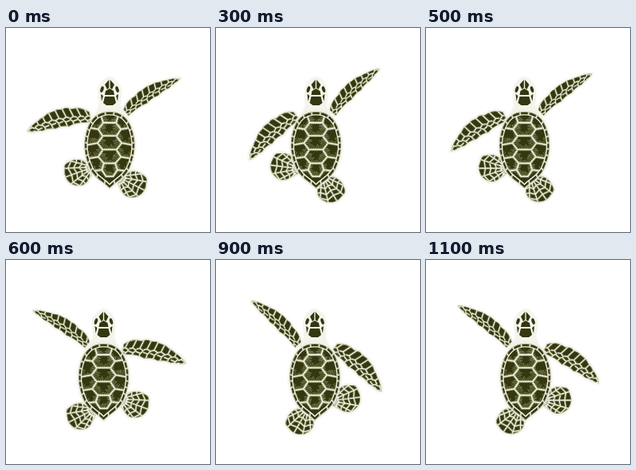
An HTML page with a canvas that plays this animation: 256 by 256 pixels, repeating every 1.2 s.

```html
<!DOCTYPE html>
<html lang="en">
<head>
<meta charset="utf-8">
<title>Swimming turtle</title>
<style>
html, body { margin: 0; width: 100%; height: 100%; overflow: hidden; background: #fff; }
canvas { display: block; width: 256px; height: 256px; }
</style>
</head>
<body>
<canvas width="256" height="256"></canvas>
<script>
const ctx = document.querySelector('canvas').getContext('2d');
const DARK = '#34370f', PALE = '#f1f2e4', HALO = '#f4f4ea', OLIVE = '#a3a778';
const STEP = 100, HALF = 6;

// Each stroke: raised flipper, trailing flipper, trailing-side foot, other foot (degrees), other hip x
const strokes = [
  [-32, 13, 20, 27, 15],
  [-37, 27, 4, 48, 12],
  [-41, 37, -8, 62, 10],
  [-43, 43, -7, 60, 10],
  [-41, 39, -4, 58, 10],
  [-37, 33, 0, 55, 9]
];
const bodyX = [130, 130, 130, 125.5, 124.5, 123.5, 122.5, 122.5, 123, 124, 124.5, 125];

const flipper = new Path2D('M-3-5C4-12 9-14 16-14C19-13 21-17 26-17C30-15 33-18 38-17C42-15 46-17 51-14C55-11 58-12 62-9C68-7 75-3 78 1C72 5 66 2 60 5C54 3 48 4 43 6C37 4 31 5 26 7C18 4 9 6-2 8Z');
const foot = new Path2D('M-4-5C4-11 8-17 18-17C22-16 27-17 29-13L32-4C33 2 31 8 27 12C20 18 14 18 9 15C4 12 0 8-4 6Z');
const shell = new Path2D('M0-43C16-43 25-33 29-18C34-2 31 15 24 30C18 41 8 45 0 53C-8 45-18 41-24 30C-31 15-34-2-29-18C-25-33-16-43 0-43Z');
const neck = new Path2D('M0-85C5-83 10-78 12-73C13-65 12-57 11-52C12-47 14-44 17-38L-17-38C-14-44-12-47-11-52C-12-57-13-65-12-73C-10-78-5-83 0-85Z');
const headPlates = new Path2D('M-.7-83L-6-77L-3-71L-.7-73ZM.7-83L6-77L3-71L.7-73ZM0-72L5-69L6-64L-6-64L-5-69ZM-6-62L6-62L8-54L4-51L-4-51L-8-54ZM-8-63L-11-65L-10-56ZM8-63L11-65L10-56Z');

const line = (path, ...p) => {
  path.moveTo(p[0], p[1]);
  for (let i = 2; i < p.length; i += 2) path.lineTo(p[i], p[i + 1]);
};

const flipperSeams = new Path2D();
for (let x = 0; x < 76; x += 9) {
  const y = -1 - 5 * Math.sin(x / 78 * Math.PI);
  line(flipperSeams, x - 4, y + 2, x, y, x + 5, y + 2);
  line(flipperSeams, x + 4, y - 16, x, y);
  line(flipperSeams, x + 5, y + 2, x + 2, y + 6, x - 4, y + 5);
  line(flipperSeams, x + 2, y + 6, x, 12);
}

const footSeams = new Path2D();
for (let i = -3; i <= 3; i++) {
  const c = Math.cos(i * 0.3), s = Math.sin(i * 0.3);
  line(footSeams, -5, 0, -5 + 45 * c, 45 * s);
  for (const r of [9, 16, 23, 30]) {
    const bend = r + (i % 2 ? 2 : -1), next = r + (i % 2 ? -1 : 2);
    line(footSeams, -5 + bend * c, bend * s,
      -5 + next * Math.cos(i * 0.3 + 0.3), next * Math.sin(i * 0.3 + 0.3));
  }
}

const rimSeams = new Path2D();
for (let i = 0; i < 24; i++) {
  const a = (i + 0.5) * Math.PI / 12;
  line(rimSeams, 0, 0, 60 * Math.cos(a), 60 * Math.sin(a));
}

// Middle scutes: centre y, half width, bottom half width
const scutes = [[-23, 16, 10], [-4, 17, 10], [15, 16, 8], [33, 11, 5]];
const shellSeams = new Path2D(), hairs = new Path2D();
for (const s of [-1, 1]) {
  let top = 9;
  for (const [y, w, bottom] of scutes) {
    line(shellSeams, s * top, y - 9, s * w, y, s * bottom, y + 9, 0, y + 9);
    line(shellSeams, s * w, y, s * 34, y + 3 * Math.sign(y + 8));
    top = bottom;
  }
  line(shellSeams, 0, -32, s * 9, -32, s * 13, -44);
}

let seed = 7;
const random = () => (seed = seed * 16807 % 2147483647) / 2147483647;
const hairCentres = scutes.map(([y]) => [0, y - 3]);
hairCentres.push([0, -43]);
for (const s of [-1, 1])
  for (const [x, y] of [[18, -34], [23, -15], [24, 5], [19, 24]]) hairCentres.push([s * x, y]);
for (const [x, y] of hairCentres) {
  for (let i = 0; i < 16; i++) {
    const a = -0.2 + 3.5 * i / 15, r = 4 + 5 * random();
    const c = Math.cos(a), s = Math.sin(a);
    line(hairs, x + r * c, y + r * s, x + 15 * c, y + 13 * s);
  }
}

function stroke(path, color, width) {
  ctx.strokeStyle = color;
  ctx.lineWidth = width;
  ctx.stroke(path);
}

function halo(path) {
  ctx.save();
  ctx.shadowColor = '#e3e4d2';
  ctx.shadowBlur = 3;
  stroke(path, HALO, 2.5);
  ctx.restore();
}

function plate(path, seams, width) {
  halo(path);
  ctx.save();
  ctx.fillStyle = DARK;
  ctx.fill(path);
  ctx.clip(path);
  stroke(seams, 'rgba(175,180,130,.4)', width + 1.8);
  stroke(seams, PALE, width);
  stroke(path, 'rgba(225,227,200,.6)', 1.5);
  ctx.restore();
}

function limb(side, x, y, degrees, path, seams, thickness = 1) {
  ctx.save();
  ctx.scale(side, 1);
  ctx.translate(x, y);
  ctx.rotate(degrees * Math.PI / 180);
  ctx.scale(1, thickness);
  plate(path, seams, 1.3);
  ctx.restore();
}

function drawHead() {
  halo(neck);
  ctx.fillStyle = '#f3f4ec';
  ctx.fill(neck);
  ctx.fillStyle = DARK;
  ctx.fill(headPlates);
  for (const s of [-1, 1]) {
    ctx.beginPath();
    ctx.ellipse(s * 9.5, -71, 2, 4, s * -0.3, 0, 7);
    ctx.fill();
  }
}

function drawShell() {
  plate(shell, rimSeams, 1.3);
  ctx.save();
  ctx.scale(0.89, 0.91);
  ctx.fillStyle = DARK;
  ctx.fill(shell);
  stroke(shell, PALE, 1.6);
  ctx.clip(shell);
  stroke(hairs, OLIVE, 0.7);
  stroke(shellSeams, 'rgba(195,199,155,.5)', 3.8);
  stroke(shellSeams, PALE, 1.7);
  ctx.restore();
}

function draw(now) {
  const step = Math.floor(now / STEP) % (2 * HALF);
  const [raised, trailing, sideFoot, rearFoot, hip] = strokes[step % HALF];
  ctx.clearRect(0, 0, 256, 256);
  ctx.save();
  ctx.translate(bodyX[step], 148);
  ctx.scale(step < HALF ? 1 : -1, 1);
  limb(1, 22, -44, raised, flipper, flipperSeams, 0.75);
  limb(-1, 27, -37, trailing, flipper, flipperSeams);
  limb(-1, 25, 28, sideFoot, foot, footSeams);
  limb(1, hip, 41, rearFoot, foot, footSeams);
  drawHead();
  drawShell();
  ctx.restore();
}

const start = performance.now();
function tick() {
  draw(performance.now() - start);
  requestAnimationFrame(tick);
}
tick();
</script>
</body>
</html>
```
